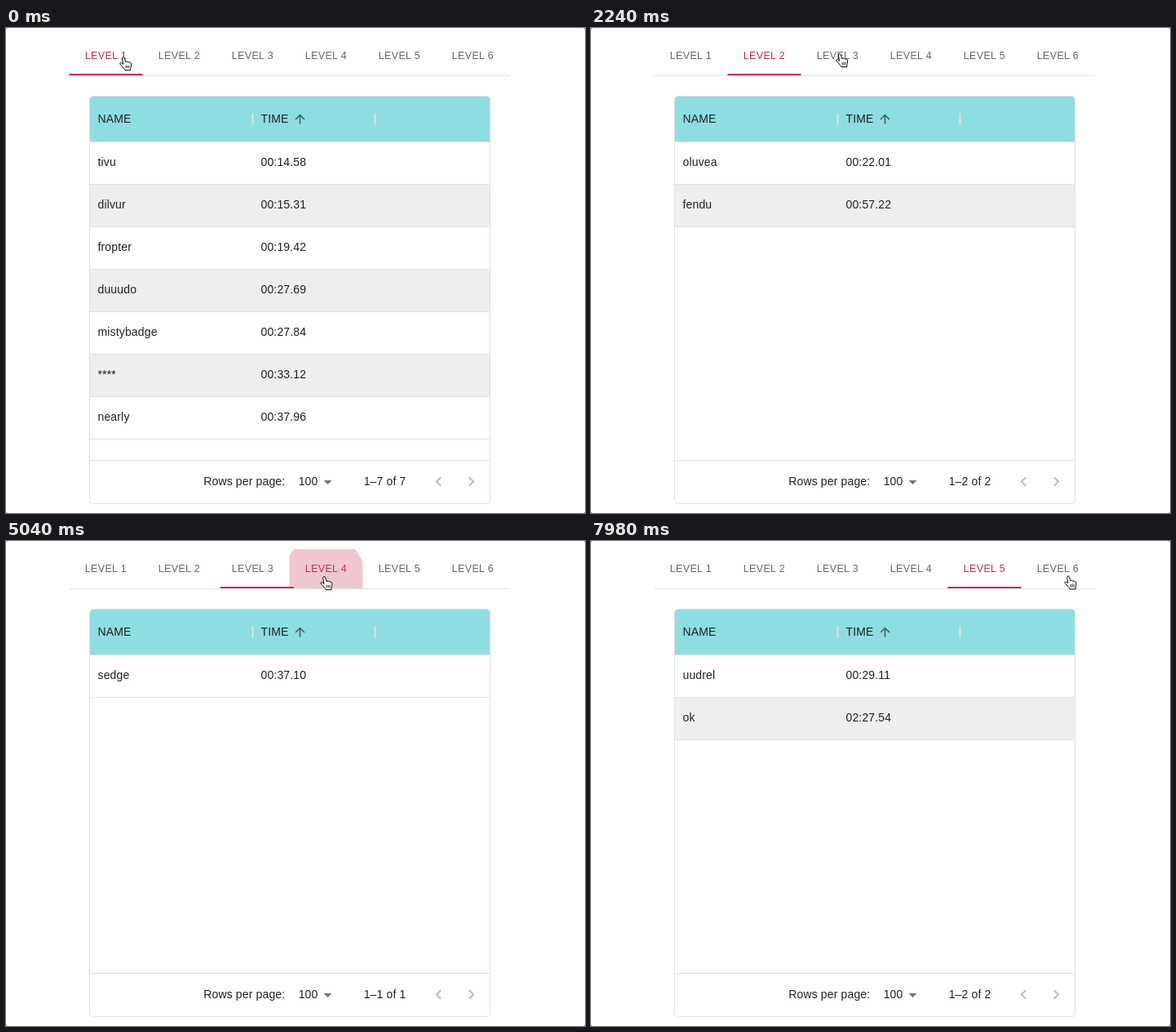
An HTML page for the animation above (8 s loop, 710 by 594 pixels).

```html
<!DOCTYPE html>
<html lang="en">
<head>
<meta charset="utf-8">
<title>Level times</title>
<style>
  html, body { margin: 0; width: 100%; height: 100%; overflow: hidden; background: #555; }
  svg { display: block; font: 14px "Liberation Sans", Arial, sans-serif; letter-spacing: .15px; }
  text { fill: #212121; white-space: pre; }
  .tab { font-size: 12.5px; letter-spacing: .357px; fill: #666; }
  .tab.on { fill: #c22b49; }
  .line { fill: #e0e0e0; }
</style>
</head>
<body>
<svg width="710" height="594" viewBox="0 0 710 594">
  <clipPath id="clip"><rect id="clipBox" y="10" width="90" height="48"/></clipPath>
  <rect width="710" height="594" rx="2" fill="#fff"/>

  <rect class="line" x="78" y="58" width="540" height="1"/>
  <g id="tabs"></g>
  <rect id="bar" y="56" width="90" height="2" fill="#c7304e"/>
  <circle id="ripple" clip-path="url(#clip)"/>

  <path d="M103 139V87q0-3 3-3H590q3 0 3 3V139z" fill="#8edde3"/>
  <rect class="line" x="103" y="139" width="490" height="1"/>
  <text x="112.5" y="116">NAME</text>
  <text x="312.5" y="116">TIME</text>
  <path class="line" d="M301.5 104.5h2v14h-2zM451.5 104.5h2v14h-2z"/>
  <path transform="translate(351.5 102.5) scale(.75)" fill="#000" fill-opacity=".6"
    d="M4 12l1.4 1.4L11 7.8V20h2V7.8l5.6 5.6L20 12l-8-8z"/>
  <g id="rows"></g>

  <rect class="line" x="103" y="529" width="490" height="1"/>
  <text x="242.2" y="560">Rows per page:</text>
  <text x="358.7" y="560">100</text>
  <path d="M389.5 554h10l-5 5z" fill="#757575"/>
  <text id="count" x="438.7" y="560"></text>
  <path d="M533.2 550.2l-5.3 5.3 5.3 5.3M567.8 550.2l5.3 5.3-5.3 5.3" fill="none" stroke="#bdbdbd" stroke-width="2"/>
  <rect x="102.5" y="83.5" width="491" height="499" rx="4" fill="none" stroke="#e0e0e0"/>

  <g id="hand" stroke="#000" stroke-linejoin="round">
    <path fill="#fff" d="M-1.3 1.4C-1.4-.2 1-.6 1.6 1L3.1 6C4 5 5.4 5.3 5.7 6.2 6.5 5.4 7.8 5.8 8 6.8 9 6.2 9.8 7 9.8 8.2 10 11 9.5 12.5 9 14V16H2.3C2 14.5-.3 12.6-1.6 11-2.6 9.7-4.2 8.6-4 7.6-3.5 6.4-1.8 7-.2 8.6z"/>
    <path d="M3.4 10v3.6M5.3 10v3.6M7.2 10v3.6" stroke-width=".8"/>
  </g>
</svg>
<script>
const $ = id => document.getElementById(id);
const LOOP = 8000, STEP = 70, LEFT = 77.5, TAB = 90;

const levels = [
  [["tivu", "00:14.58"], ["dilvur", "00:15.31"], ["fropter", "00:19.42"], ["duuudo", "00:27.69"],
   ["mistybadge", "00:27.84"], ["****", "00:33.12"], ["nearly", "00:37.96"]],
  [["oluvea", "00:22.01"], ["fendu", "00:57.22"]],
  [["ebrik", "00:31.33"], ["stirplet", "01:07.02"]],
  [["sedge", "00:37.10"]],
  [["uudrel", "00:29.11"], ["ok", "02:27.54"]]
];

// One press per tab from the second on: pointer down, pointer up, place
const presses = [
  { down: 1150, up: 1465, x: 205, y: 43 },
  { down: 2880, up: 3170, x: 305.5, y: 34 },
  { down: 4728, up: 4997, x: 390.5, y: 43 },
  { down: 6815, up: 7040, x: 485, y: 36 }
];

// Pointer stops: time, x, y
const stops = [
  [280, 143.7, 35.7], [630, 203.7, 41.7], [1680, 203.7, 41.7], [1960, 301, 55],
  [2240, 304.7, 31.7], [3430, 304.7, 31.7], [3640, 362, 56], [3990, 390, 43.7],
  [5670, 390, 43.7], [6000, 440, 61], [6300, 484.2, 36.5], [7490, 484.2, 36.5],
  [7630, 495, 45], [7800, 540, 72], [7980, 585, 43]
];

// cubic-bezier(.4, 0, .2, 1)
function ease(p) {
  if (p <= 0) return 0;
  if (p >= 1) return 1;
  let lo = 0, hi = 1, s;
  for (let i = 0; i < 20; i++) {
    s = (lo + hi) / 2;
    const x = 1.2 * (1 - s) ** 2 * s + .6 * (1 - s) * s * s + s ** 3;
    if (x < p) lo = s; else hi = s;
  }
  return s * s * (3 - 2 * s);
}

function pointer(t) {
  const i = stops.findIndex(s => s[0] >= t);
  if (i === 0) return stops[0].slice(1);
  const [t0, x0, y0] = stops[i - 1], [t1, x1, y1] = stops[i];
  const p = (t - t0) / (t1 - t0);
  return [x0 + (x1 - x0) * p, y0 + (y1 - y0) * p];
}

function set(id, attrs) {
  for (const k in attrs) $(id).setAttribute(k, attrs[k]);
}

let shown = -1;
function show(level) {
  if (level === shown) return;
  shown = level;
  const rows = levels[level];
  $("tabs").innerHTML = [0, 1, 2, 3, 4, 5].map(i =>
    `<text class="tab${i === level ? " on" : ""}" x="${96.7 + TAB * i}" y="38">LEVEL ${i + 1}</text>`).join("");
  $("rows").innerHTML = rows.map(([name, time], i) => {
    const y = 140 + 52 * i;
    return `<rect x="103" y="${y}" width="490" height="51" fill="${i % 2 ? "#eee" : "#fff"}"/>
      <rect class="line" x="103" y="${y + 51}" width="490" height="1"/>
      <text x="112.5" y="${y + 29}">${name}</text><text x="312.5" y="${y + 29}">${time}</text>`;
  }).join("");
  $("count").textContent = `1–${rows.length} of ${rows.length}`;
}

function drawRipple(t) {
  const i = presses.findIndex(p => t >= p.down && t < p.up + 550);
  if (i < 0) return set("ripple", { r: 0 });
  const { down, up, x, y } = presses[i];
  const left = LEFT + TAB * (i + 1);
  const dx = Math.max(x - left, left + TAB - x) + 1;
  const dy = Math.max(y - 10, 58 - y) + 1;
  const grow = ease((t - down) / 550);
  set("clipBox", { x: left });
  set("ripple", {
    cx: x, cy: y, r: Math.hypot(dx, dy) * grow,
    fill: t < up ? "#666" : "#c7304e",
    opacity: (.1 + .2 * grow) * (1 - ease((t - up) / 550))
  });
}

function draw(now) {
  const t = Math.floor(now % LOOP / STEP) * STEP;
  show(presses.filter(p => t >= p.up).length);
  const slid = presses.reduce((sum, p) => sum + ease((t - p.up) / 300), 0);
  set("bar", { x: LEFT + TAB * slid });
  drawRipple(t);
  set("hand", { transform: `translate(${pointer(t)})` });
}

const start = performance.now();
function tick() {
  draw(performance.now() - start);
  requestAnimationFrame(tick);
}
tick();
</script>
</body>
</html>
```
